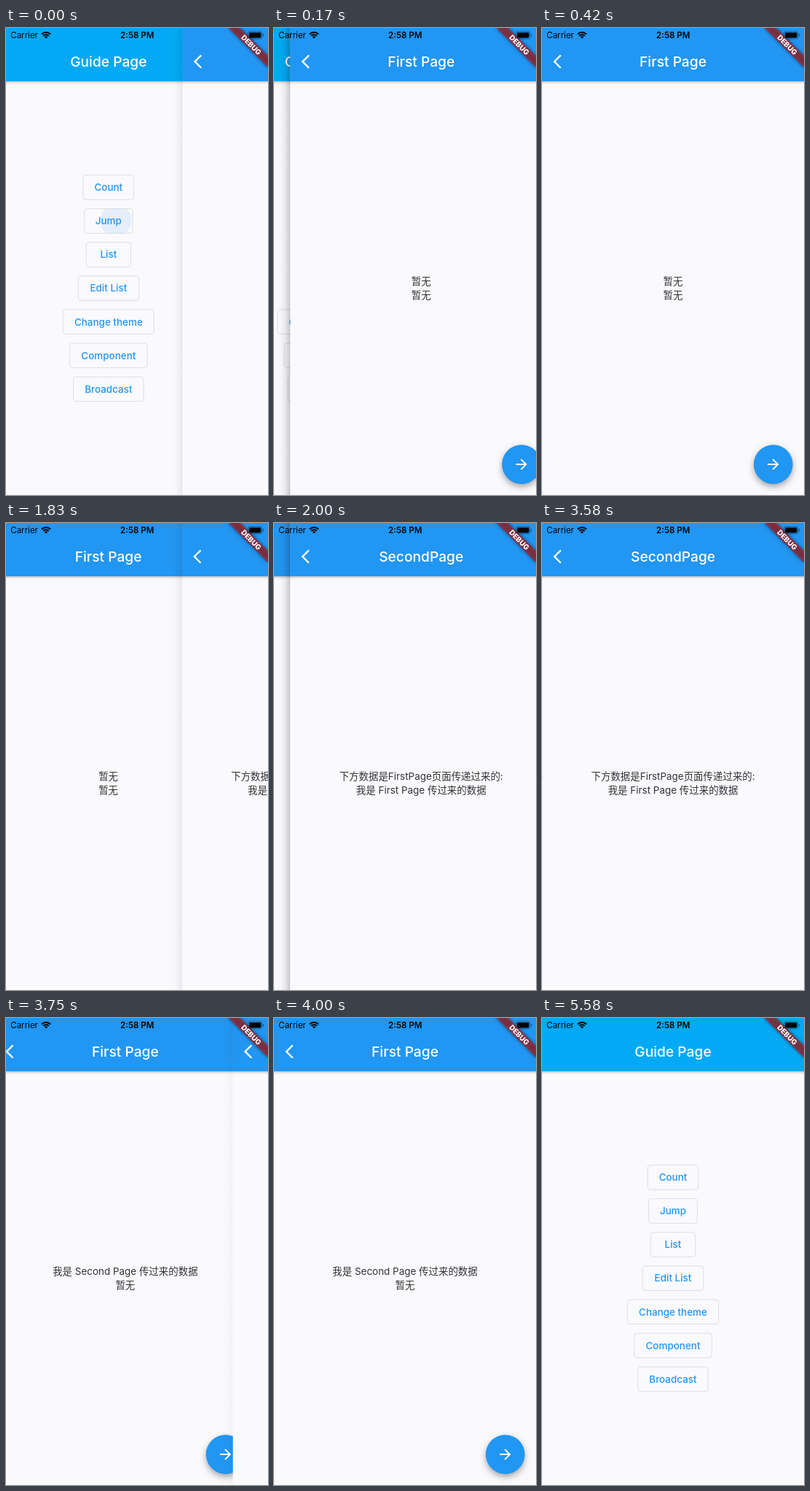
These frames come from a looping animation (360x640 px, 6.01 s). An HTML page with a canvas:

```html
<!DOCTYPE html>
<html lang="zh-CN">
<head>
<meta charset="utf-8">
<title>Page navigation</title>
<style>
html, body { margin: 0; width: 100%; height: 100%; overflow: hidden; background: #faf9fc; }
canvas { display: block; width: 360px; height: 640px; }
</style>
</head>
<body>
<canvas id="stage"></canvas>
<script>
const canvas = document.getElementById('stage');
const ctx = canvas.getContext('2d');
const dpr = window.devicePixelRatio || 1;
canvas.width = 360 * dpr;
canvas.height = 640 * dpr;

// Layout is in device points: 375 wide, shown at 0.96.
const W = 375, H = 667, SCALE = 0.96, BAR = 76;
const LOOP = 6010, FPS = 12, SLIDE = 400;
const BG = '#faf9fc', BLUE = '#2196f3', LIGHT_BLUE = '#03a9f4', INK = '#333335';
const LATIN = 'Inter, "Noto Sans CJK SC", "Noto Sans CJK", sans-serif';

const BUTTONS = [
  ['Count', 72.5], ['Jump', 69.5], ['List', 64], ['Edit List', 87],
  ['Change theme', 130.5], ['Component', 111], ['Broadcast', 100.5]
];
const BACK = new Path2D('M11.67 3.87L9.9 2.1 0 12l9.9 9.9 1.77-1.77L3.54 12z');
const FORWARD = new Path2D('M12 4l-1.41 1.41L16.17 11H4v2h12.17l-5.58 5.59L12 20l8-8z');

const clamp = v => Math.max(0, Math.min(1, v));

// cubic-bezier(.35, .91, .33, .97)
function ease(t) {
  if (t <= 0 || t >= 1) return clamp(t);
  const at = (s, a, b) => 3 * (1 - s) * (1 - s) * s * a + 3 * (1 - s) * s * s * b + s * s * s;
  let lo = 0, hi = 1;
  for (let i = 0; i < 30; i++) {
    const mid = (lo + hi) / 2;
    if (at(mid, 0.35, 0.33) < t) lo = mid; else hi = mid;
  }
  return at(lo, 0.91, 0.97);
}

function text(str, x, y, size, weight, color, align = 'center') {
  ctx.font = `${weight} ${size}px ${LATIN}`;
  ctx.textAlign = align;
  ctx.fillStyle = color;
  ctx.fillText(str, x, y);
}

function icon(path, x, y) {
  ctx.save();
  ctx.translate(x, y);
  ctx.fillStyle = '#fff';
  ctx.fill(path);
  ctx.restore();
}

function roundRect(x, y, w, h, r) {
  ctx.beginPath();
  ctx.roundRect(x, y, w, h, r);
}

// Shadow sizes ignore the canvas transform, so scale them here.
function shadow(color, blur, dy) {
  const k = SCALE * dpr;
  ctx.shadowColor = color;
  ctx.shadowBlur = blur * k;
  ctx.shadowOffsetY = dy * k;
}

function appBar(title, color, back) {
  ctx.save();
  shadow('rgba(0,0,0,.34)', 4, 1.5);
  ctx.fillStyle = color;
  ctx.fillRect(-10, -10, W + 20, BAR + 10);
  ctx.restore();
  text(title, W / 2, 55.2, 20, 500, '#fff');
  if (back) icon(BACK, 16, 36);
}

function lines(first, second) {
  text(first, W / 2, 366.6, 14, 400, INK);
  text(second, W / 2, 386.6, 14, 400, INK);
}

function splash(age) {
  const fade = 1 - clamp((age - 50) / 300);
  if (fade <= 0) return;
  ctx.save();
  ctx.clip();
  ctx.fillStyle = `rgba(33,150,243,${0.1 * fade})`;
  ctx.beginPath();
  ctx.arc(198, 275, 22.4 + 0.1 * (age - 50), 0, 2 * Math.PI);
  ctx.fill();
  ctx.restore();
}

function guidePage(splashAge) {
  BUTTONS.forEach(([label, w], i) => {
    const cy = 227.5 + i * 48;
    roundRect((W - w) / 2, cy - 17.5, w, 35, 4);
    ctx.strokeStyle = '#dedde0';
    ctx.lineWidth = 1;
    ctx.stroke();
    if (label === 'Jump') splash(splashAge);
    text(label, W / 2, cy + 5, 14, 500, BLUE);
  });
  appBar('Guide Page', LIGHT_BLUE, false);
}

function firstPage(message) {
  lines(message, '暂无');
  ctx.save();
  shadow('rgba(0,0,0,.34)', 9, 4);
  ctx.fillStyle = BLUE;
  ctx.beginPath();
  ctx.arc(331, 623, 28, 0, 2 * Math.PI);
  ctx.fill();
  ctx.restore();
  icon(FORWARD, 319, 611);
  appBar('First Page', BLUE, true);
}

function secondPage() {
  lines('下方数据是FirstPage页面传递过来的:', '我是 First Page 传过来的数据');
  appBar('SecondPage', BLUE, true);
}

function page(x, draw) {
  ctx.save();
  ctx.translate(x, 0);
  ctx.beginPath();
  ctx.rect(0, 0, W, H);
  ctx.clip();
  ctx.fillStyle = BG;
  ctx.fillRect(0, 0, W, H);
  draw();
  ctx.restore();
}

// cover: 0 shows only the lower page, 1 only the upper one.
function stack(lower, upper, cover) {
  const x = W * (1 - cover);
  if (cover < 1) page(-W * cover / 3, lower);
  if (cover <= 0) return;
  if (cover < 1) {
    const edge = ctx.createLinearGradient(x - 18.75, 0, x, 0);
    [[0, 0], [0.3, 0.016], [0.6, 0.07], [1, 0.22]].forEach(([stop, a]) =>
      edge.addColorStop(stop, `rgba(0,0,0,${a * cover})`));
    ctx.fillStyle = edge;
    ctx.fillRect(x - 18.75, 0, 18.75, H);
  }
  page(x, upper);
}

function debugBanner() {
  ctx.save();
  ctx.translate(W, 0);
  ctx.rotate(Math.PI / 4);
  ctx.save();
  shadow('rgba(0,0,0,.5)', 6, 0);
  // The shadow comes from an opaque copy kept off stage.
  ctx.shadowOffsetX = 2000 * dpr;
  ctx.translate(-2000 / SCALE * Math.SQRT1_2, 2000 / SCALE * Math.SQRT1_2);
  ctx.fillStyle = '#000';
  ctx.fillRect(-40, 28, 80, 12);
  ctx.restore();
  ctx.fillStyle = 'rgba(183,28,28,.627)';
  ctx.fillRect(-40, 28, 80, 12);
  text('DEBUG', 0, 37.7, 10.2, 800, '#fff');
  ctx.restore();
}

function statusBar() {
  text('Carrier', 6.5, 14.6, 12, 400, '#000', 'left');
  text('2:58 PM', 187.7, 14.6, 12, 600, '#000');

  const up = -Math.PI / 2, half = Math.PI / 4;
  ctx.fillStyle = ctx.strokeStyle = '#000';
  ctx.lineWidth = 2.1;
  ctx.beginPath();
  ctx.moveTo(57.3, 15.2);
  ctx.arc(57.3, 15.2, 3.4, up - half, up + half);
  ctx.fill();
  for (const r of [5.6, 9]) {
    ctx.beginPath();
    ctx.arc(57.3, 15.2, r, up - half, up + half);
    ctx.stroke();
  }

  ctx.strokeStyle = ctx.fillStyle = 'rgba(0,0,0,.4)';
  ctx.lineWidth = 1;
  roundRect(346.5, 5, 20, 10.5, 2.6);
  ctx.stroke();
  roundRect(367.6, 8.4, 1.3, 3.8, 0.6);
  ctx.fill();
  ctx.fillStyle = '#000';
  roundRect(348, 6.5, 17, 7.5, 1.4);
  ctx.fill();
}

function render(now) {
  // The screen refreshes at a fixed, low rate.
  const t = Math.floor((now % LOOP + 3.4) * FPS / 1000) * 1000 / FPS;
  const slide = start => ease((t - start) / SLIDE);
  const k = SCALE * dpr;
  ctx.setTransform(k, 0, 0, k, 0, 0);
  ctx.fillStyle = BG;
  ctx.fillRect(0, 0, W, H);

  const guide = () => guidePage(t < 1000 ? t + 50 : 9999);
  const first = () => firstPage(t < 3500 ? '暂无' : '我是 Second Page 传过来的数据');
  if (t < 1783) stack(guide, first, slide(-50));
  else if (t < 3583) stack(first, secondPage, slide(1783));
  else if (t < 5583) stack(first, secondPage, 1 - slide(3583.3));
  else stack(guide, first, 0);

  debugBanner();
  statusBar();
}

const origin = performance.now();
function tick() {
  render(performance.now() - origin);
  requestAnimationFrame(tick);
}
tick();
</script>
</body>
</html>
```
